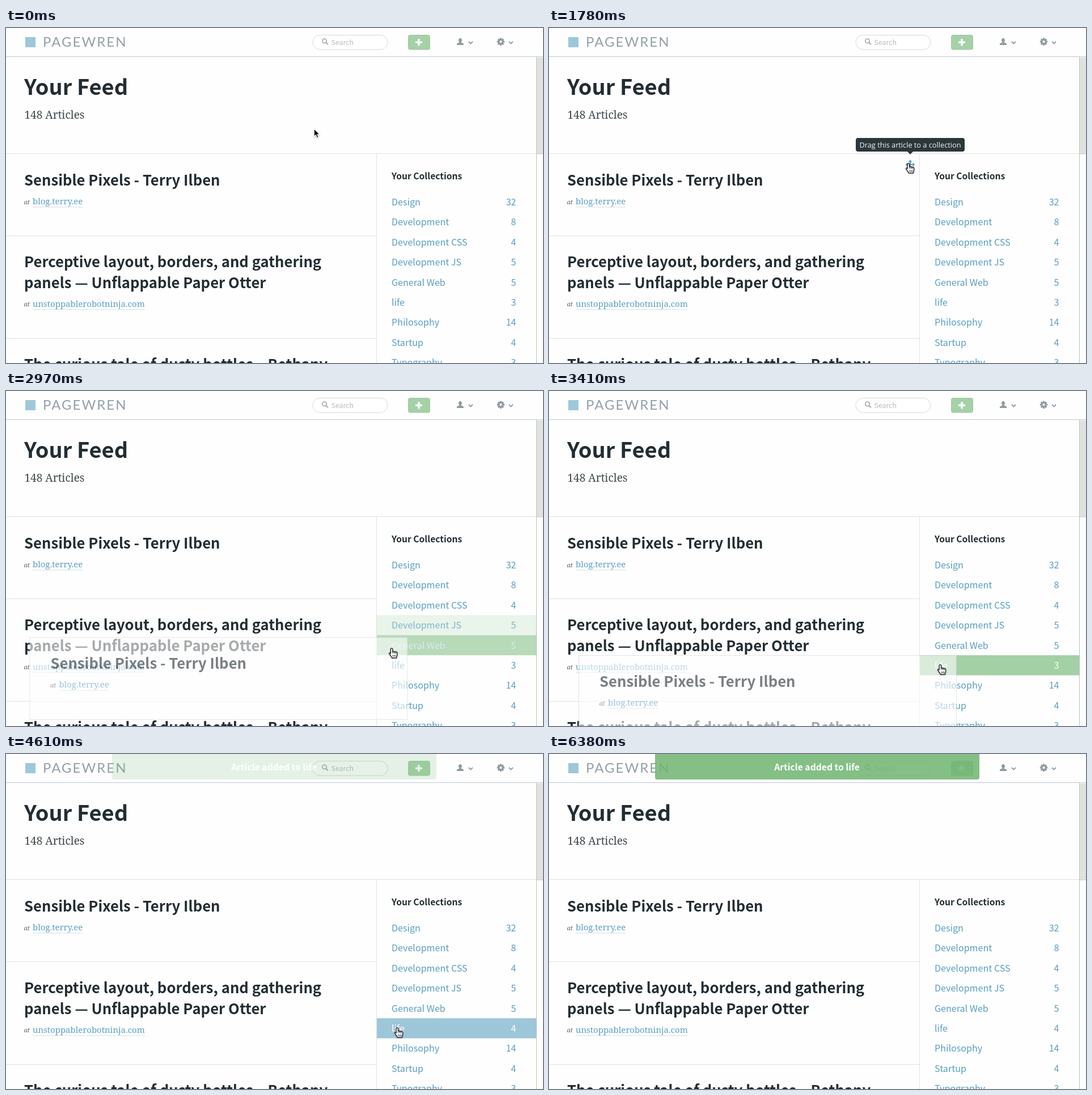
Write an HTML page that moves like this. It is 947 by 591 pixels and loops after 6800 ms.

```html
<!DOCTYPE html>
<html lang="en">
<head>
<meta charset="utf-8">
<title>Article feed</title>
<style>
  html, body { margin: 0; width: 100%; height: 100%; overflow: hidden; background: #fefefe; }
  svg { display: block; width: 100%; height: 100%; }
  text { font-family: "Noto Sans CJK JP", "Noto Sans CJK SC", "Noto Sans CJK", sans-serif; white-space: pre; }
  .title { font-weight: 700; font-size: 25.7px; fill: #222d32; }
  .serif { font-family: "Noto Serif", serif; }
  .at { font-size: 11px; font-style: italic; fill: #5d6468; }
  .site { font-size: 14.95px; fill: #5b9fc3; }
  .row { font-size: 16.1px; }
  .line { stroke: #dfe2e2; }
  .icon { fill: #8e9a9f; }
  .chevron { fill: none; stroke: #8e9a9f; stroke-width: 1.8; }
</style>
</head>
<body>
<svg id="stage" viewBox="0 0 947 591"></svg>
<script>
const LOOP = 6800;
const ROW_TOP = 289.3, ROW_HEIGHT = 35.37, SIDEBAR = 653.5;
const GREEN = [163, 208, 165], BLUE = [158, 198, 217], LINK = [90, 158, 192], WHITE = [255, 255, 255];
const LIFE = 5;

const collections = [
  ["Design", 32], ["Development", 8], ["Development CSS", 4], ["Development JS", 5], ["General Web", 5],
  ["life", 3], ["Philosophy", 14], ["Startup", 4], ["Typography", 3]
];

// Bursts of activity: start, end, number of picture changes
const bursts = [[900, 1780, 7], [2380, 3410, 8], [3860, 4310, 4], [4610, 5350, 6], [5790, 6380, 5]];

// Pointer path: time, x, y
const path = [
  [850, 543, 177.5], [1050, 568, 192], [1250, 604, 217], [1480, 634, 240], [2350, 634, 240],
  [2530, 645, 320], [2674, 664, 405], [2900, 678, 448], [3260, 690, 484],
  [4640, 690, 484], [5000, 632, 479], [5280, 599, 475.5], [5760, 599, 475.5],
  [5938, 640, 505], [6085, 690, 550], [6200, 720, 600]
];

const line = (x1, y1, x2, y2, attrs = 'class="line"') =>
  `<line x1="${x1}" y1="${y1}" x2="${x2}" y2="${y2}" ${attrs}/>`;
const text = (x, y, content, attrs) => `<text x="${x}" y="${y}" ${attrs}>${content}</text>`;
const chevron = x => `<path class="chevron" d="M${x - 3.5} 24l3.5 3.5 3.5-3.5"/>`;

function article(lines, site) {
  const y = 56 + (lines.length - 1) * 36.5;
  return lines.map((words, i) => text(32, 56 + i * 36.5, words, 'class="title"')).join("") +
    text(31.5, y + 32.5, "at", 'class="serif at"') +
    text(47, y + 33, site, 'class="serif site"') +
    line(47, y + 38, 138, y + 38, 'class="underline" stroke="#cfe1ea"');
}

const place = (x, y, content, id = "") => `<g ${id && `id="${id}"`} transform="translate(${x} ${y})">${content}</g>`;

const first = article(["Sensible Pixels - Terry Ilben"], "blog.terry.ee");

const gear = [0, 45, 90, 135].map(angle =>
  `<rect x="-1.6" y="-6.7" width="3.2" height="13.4" rx=".6" transform="rotate(${angle})"/>`).join("") +
  '<circle r="4.9"/><circle r="2.1" fill="#fefefe"/>';

const moveIcon = '<path d="M-6 0H6M0-6V6" stroke="currentColor" stroke-width="2.2"/>' +
  [0, 90, 180, 270].map(angle =>
    `<path d="M-3.6-4.6L0-8.4l3.6 3.8z" fill="currentColor" transform="rotate(${angle})"/>`).join("");

const header = `
  <rect width="947" height="50" fill="#fefefe"/>
  ${line(0, 50.5, 947, 50.5, 'stroke="#bccacf"')}
  <rect x="34" y="16" width="18" height="18" fill="#9fc7da"/>
  <text x="65" y="33" style="font-family:Lato,sans-serif" font-weight="400" font-size="24"
    letter-spacing="2" fill="#93a1a7">PAGEWREN</text>
  <rect x="541" y="12.5" width="132" height="25.5" rx="12.75" fill="#fff" stroke="#d6d9d9"/>
  <circle cx="561.5" cy="22.8" r="3.7" fill="none" stroke="#a9b0b2" stroke-width="1.8"/>
  <path d="M564.2 25.6l3.6 3.6" stroke="#a9b0b2" stroke-width="2.2"/>
  ${text(573.5, 29.5, "Search", 'font-size="12.4" fill="#b8bcbd"')}
  <rect x="709.5" y="12.5" width="38" height="25.5" rx="3" fill="#a5d1a7" stroke="#9bcaa0"/>
  <path d="M722 25.2h12M728 19.2v12" stroke="#fff" stroke-width="3.4"/>
  <path class="icon" d="M801 18a3 3.4 0 0 1 1.7 6.2v1.3l4.3 2V30h-12v-2.5l4.3-2v-1.3A3 3.4 0 0 1 801 18z"/>
  ${chevron(819.5)}
  <g class="icon" transform="translate(872.5 24.2)">${gear}</g>
  ${chevron(890.5)}`;

const sidebar = collections.map(([name, count], i) => {
  const y = ROW_TOP + i * ROW_HEIGHT;
  return `<g class="entry"><rect x="654" y="${y}" width="281" height="${ROW_HEIGHT}"/>` +
    text(680, y + 23.8, name, 'class="row"') +
    text(899.5, y + 23.8, count, 'class="row" text-anchor="end"') + "</g>";
}).join("");

const arrow = '<path d="M.3.4V14l3.1-2.9 2.2 5 2.5-1.1-2.2-4.8h4.2z" stroke="#fff" stroke-width="1.1"/>';
const hand = `<path d="M-1.9.6a1.7 1.7 0 0 1 3.4 0v4.7a1.5 1.5 0 0 1 2.8.3 1.5 1.5 0 0 1 2.7.5 1.4 1.4 0 0 1 2.6.8
  v3.6c0 2-1.2 2.8-1.2 5.4H.3c0-1.8-2.4-3.2-4.6-7.4-.7-1.5 1-2.5 2.4-.6z" fill="#fff" stroke="#111" stroke-width="1.25"/>
  <path d="M1.6 5.3v2.8M4.4 5.9v2.4M7 6.7v2M2 10.8v3M4.4 10.8v3M6.7 10.8v3" stroke="#111" fill="none"/>`;

const stage = document.getElementById("stage");
stage.innerHTML = `
  <rect width="947" height="591" fill="#fefefe"/>
  ${text(32, 118, "Your Feed", 'font-weight="700" font-size="38" fill="#222d32"')}
  ${text(32.5, 159.5, "148 Articles", 'class="serif" font-size="19" fill="#3c4549"')}
  ${line(0, 221.5, 935, 221.5)}${line(0, 366.5, 653, 366.5)}${line(0, 547.5, 653, 547.5)}
  ${line(SIDEBAR, 222, SIDEBAR, 591)}
  ${place(0, 222, first)}
  ${place(0, 366.3, article(["Perceptive layout, borders, and gathering", "panels — Unflappable Paper Otter"],
    "unstoppablerobotninja.com"))}
  ${text(32, 603, "The curious tale of dusty bottles – Bethany", 'class="title"')}
  ${text(680, 266.5, "Your Collections", 'font-weight="700" font-size="15.65" fill="#222d32"')}
  ${sidebar}
  <rect x="935" y="51" width="12" height="540" fill="#fdfdfd"/>
  <rect x="936" y="52" width="11" height="170" fill="#e1e2de"/>
  ${line(935.5, 51, 935.5, 591, 'stroke="#bdc1be"')}${line(936, 222, 947, 222, 'stroke="#c3c6c2"')}
  ${header}
  ${place(637, 241, moveIcon, "firstHandle")}
  ${place(637, 384, moveIcon, "secondHandle")}
  <g id="ghost">
    <rect x=".5" y=".5" width="666" height="144.5" fill="#fefefe" stroke="#d3d7d7"/>
    ${place(5, 0, first)}
  </g>
  <g id="tooltip">
    <path d="M545 194h184a4 4 0 0 1 4 4v16a4 4 0 0 1-4 4h-87l-5 5-5-5h-87a4 4 0 0 1-4-4v-16a4 4 0 0 1 4-4z"
      fill="#2c363b"/>
    <text x="637" y="210.5" text-anchor="middle" fill="#f4f6f6" font-size="12.75"
      style="font-family:'Open Sans','Noto Sans',sans-serif">Drag this article to a collection</text>
  </g>
  <g id="banner">
    <path d="M187 0H759V41a4 4 0 0 1-4 4H191a4 4 0 0 1-4-4z" fill="#70b573" fill-opacity=".86"/>
    ${text(472.5, 28.5, "Article added to life", 'font-weight="700" font-size="15.7" fill="#fff" text-anchor="middle"')}
  </g>
  <g id="pointer" style="filter:drop-shadow(0 1px 1px rgba(0,0,0,.3))">
    <g id="arrow">${arrow}</g><g id="hand">${hand}</g>
  </g>`;

const part = id => document.getElementById(id);
const [ghost, tooltip, banner, pointer, arrowShape, handShape, firstHandle, secondHandle] =
  ["ghost", "tooltip", "banner", "pointer", "arrow", "hand", "firstHandle", "secondHandle"].map(part);
const entries = [...document.querySelectorAll(".entry")];

for (const rule of document.querySelectorAll(".underline")) {
  rule.setAttribute("x2", 47 + rule.previousElementSibling.getComputedTextLength());
}

const ramp = (t, from, to) => Math.min(1, Math.max(0, (t - from) / (to - from)));
const blend = (a, b, k) => a.map((v, i) => v + (b[i] - v) * k);
const rgb = color => `rgb(${color.map(Math.round)})`;
const fade = (node, opacity) => node.setAttribute("opacity", opacity);
const move = (node, x, y) => node.setAttribute("transform", `translate(${x} ${y})`);

function stepped(t) {
  let shown = 0;
  for (const [start, end, count] of bursts) {
    if (t < start) break;
    const step = (end - start) / (count - 1);
    shown = Math.min(end, start + Math.floor((t - start) / step) * step);
  }
  return shown;
}

function pointerAt(t) {
  const next = path.findIndex(key => key[0] > t);
  if (next === 0) return path[0].slice(1);
  if (next < 0) return path[path.length - 1].slice(1);
  const [a, b] = [path[next - 1], path[next]];
  return blend(a, b, ramp(t, a[0], b[0])).slice(1);
}

function rowAt([x, y]) {
  return x > SIDEBAR && y < 591 ? Math.floor((y - ROW_TOP) / ROW_HEIGHT) : -1;
}

const LAG = 25, HOVER_FADE = 180, SAMPLES = 18;

// Share of the recent past that the pointer spent on each row
function hoverLevels(t) {
  const levels = collections.map(() => 0);
  for (let i = 0; i < SAMPLES; i++) {
    const row = rowAt(pointerAt(t - LAG - HOVER_FADE * i / SAMPLES));
    if (row >= 0) levels[row] += 1 / SAMPLES;
  }
  return levels;
}

function draw(time) {
  const t = stepped(time);
  const spot = pointerAt(t);
  const dropped = t >= 3860;

  move(pointer, ...spot);
  const useHand = rowAt(spot) >= 0 || (t >= 1480 && !dropped);
  fade(handShape, useHand ? 1 : 0);
  fade(arrowShape, useHand ? 0 : 1);

  const [x, y] = pointerAt(t - LAG);
  move(ghost, x - 638, y - 18);
  fade(ghost, t < 2380 ? 0 : 0.6 * (1 - ramp(t, 3760, 4310)));

  const leaving = 1 - ramp(t, 2300, 2460);
  fade(tooltip, ramp(t, 1480, 1700) * leaving);
  fade(firstHandle, ramp(t, 1230, 1400) * leaving);
  firstHandle.style.color = rgb(blend([213, 218, 218], LINK, ramp(t, 1400, 1633)));
  fade(secondHandle, ramp(t, 4920, 5150) * (1 - ramp(t, 5960, 6100)));
  secondHandle.style.color = "#d5dada";

  fade(banner, ramp(t, 4462, 5200));

  const accent = blend(GREEN, BLUE, ramp(t, 3760, 4160));
  hoverLevels(t).forEach((level, i) => {
    const [back, name, count] = entries[i].children;
    back.setAttribute("fill", rgb(accent));
    fade(back, level);
    const ink = rgb(blend(LINK, WHITE, level));
    name.setAttribute("fill", ink);
    count.setAttribute("fill", ink);
  });
  entries[LIFE].children[2].textContent = dropped ? 4 : 3;
}

const began = performance.now();
function tick() {
  draw((performance.now() - began) % LOOP);
  requestAnimationFrame(tick);
}
tick();
</script>
</body>
</html>
```
